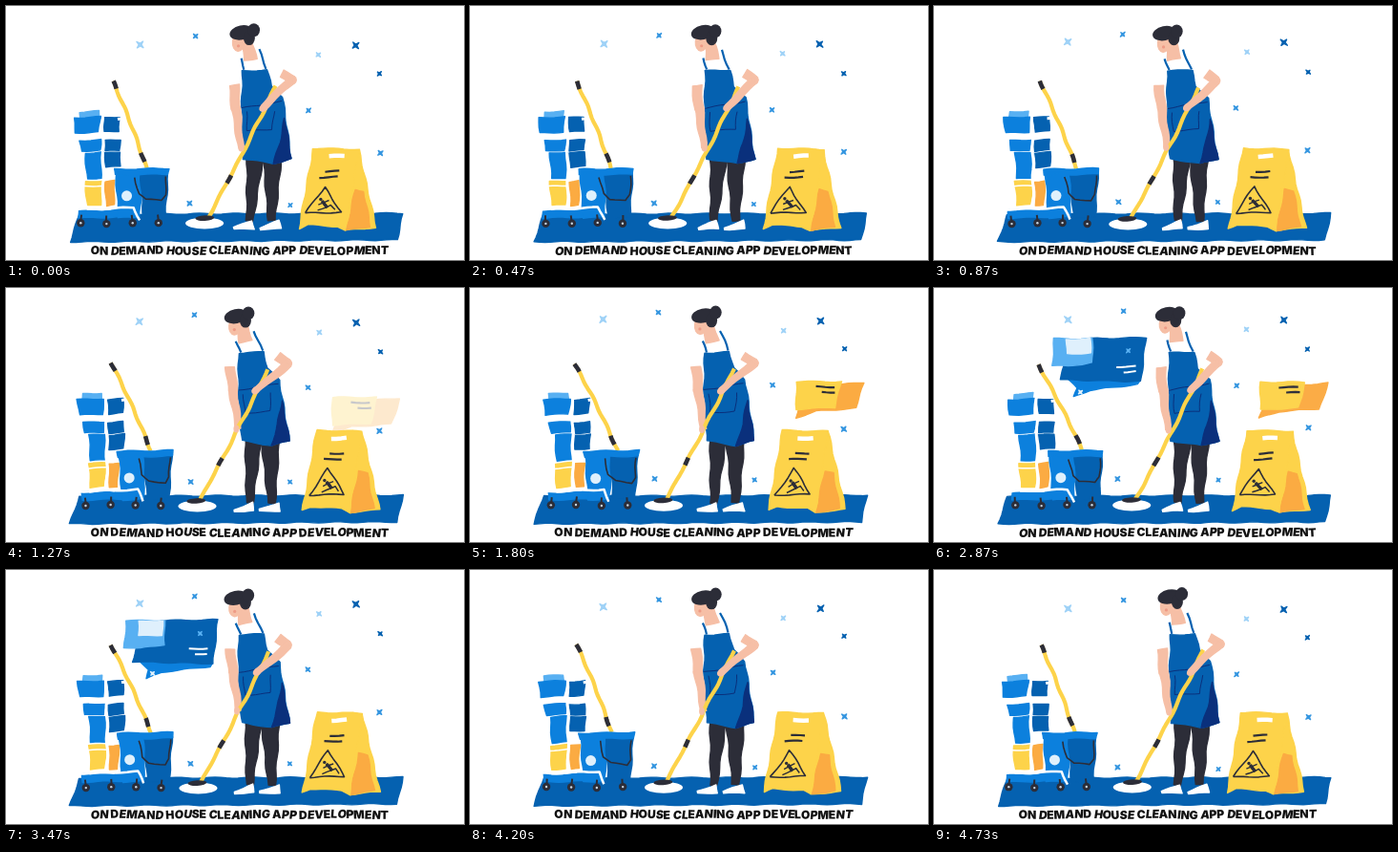
An HTML page with a canvas for the animation above (4.79 s loop, 480 px wide and 266 px high).

```html
<!DOCTYPE html>
<html lang="en">
<head>
<meta charset="utf-8">
<title>On demand house cleaning</title>
<style>
html, body { margin: 0; width: 100%; height: 100%; overflow: hidden; background: #fff; }
canvas { display: block; width: 100%; height: 100%; }
</style>
</head>
<body>
<canvas id="stage"></canvas>
<script>
const W = 480, H = 266, LOOP = 4790, STEPS = 72, TAU = Math.PI * 2;
const BLUE = '#0561b0', BRIGHT = '#0c80dd', SKY = '#58b0f2', PALE = '#dff0fc';
const NAVY = '#0a307c', INK = '#2c2d38', YELLOW = '#fdd34a', ORANGE = '#fbab42', SKIN = '#f6bfa6';
const CAPTION = 'ON DEMAND HOUSE CLEANING APP DEVELOPMENT';

const canvas = document.getElementById('stage');
const layer = document.createElement('canvas');
let ctx = canvas.getContext('2d');
let phase = 0;                       // position in the loop, 0..1
let warp = (x, y) => [x, y];         // motion of the current group

const swing = p => (1 - Math.cos(TAU * p)) / 2;
const clamp = v => Math.max(0, Math.min(1, v));
const mix = (a, b, k) => a + (b - a) * k;

// Hand-drawn wobble shared by every outline
function place(x, y) {
  const [px, py] = warp(x, y), a = TAU * 2 * phase;
  return [px + 0.7 * Math.sin(py * 0.2 + px * 0.04 + a),
          py + 0.6 * Math.sin(px * 0.16 - py * 0.04 - a)];
}

// Splits each side so that long edges wobble too
function trace(pts, closed) {
  const n = pts.length / 2, sides = closed ? n : n - 1;
  ctx.beginPath();
  for (let i = 0; i < sides; i++) {
    const j = (i + 1) % n;
    const [x0, y0, x1, y1] = [pts[2 * i], pts[2 * i + 1], pts[2 * j], pts[2 * j + 1]];
    const cuts = Math.ceil(Math.hypot(x1 - x0, y1 - y0) / 6);
    for (let c = 0; c <= cuts; c++) ctx.lineTo(...place(mix(x0, x1, c / cuts), mix(y0, y1, c / cuts)));
  }
  if (closed) ctx.closePath();
}

function line(color, width, ...pts) {
  trace(pts, false);
  ctx.strokeStyle = color;
  ctx.lineWidth = width;
  ctx.stroke();
}

function shape(color, ...pts) {
  trace(pts, true);
  ctx.fillStyle = ctx.strokeStyle = color;
  ctx.lineWidth = 1.4;
  ctx.fill();
  ctx.stroke();
}

// Box whose lower edge is narrower by `taper` on both sides
const box = (color, x, y, w, h, taper = 0) =>
  shape(color, x, y, x + w, y - 1, x + w - taper, y + h - 1, x + taper, y + h);

// Bar from one point to another, with its own width at each end
function limb(color, x0, y0, w0, x1, y1, w1) {
  const d = 2 * Math.hypot(x1 - x0, y1 - y0), nx = (y0 - y1) / d, ny = (x1 - x0) / d;
  shape(color, x0 + nx * w0, y0 + ny * w0, x1 + nx * w1, y1 + ny * w1,
    x1 - nx * w1, y1 - ny * w1, x0 - nx * w0, y0 - ny * w0);
}

function oval(color, x, y, rx, ry = rx, turn = 0) {
  ctx.beginPath();
  ctx.ellipse(...place(x, y), rx, ry, turn, 0, TAU);
  ctx.fillStyle = color;
  ctx.fill();
}

function star(x, y, r, color) {
  const pts = [];
  for (let i = 0; i < 8; i++) {
    const a = TAU / 8 * (i + 1), d = i % 2 ? r * 0.3 : r;
    pts.push(x + d * Math.cos(a), y + d * Math.sin(a));
  }
  shape(color, ...pts);
}

// Pole with a slight bulge and dark bands, given as [start, end] along its length
function pole(x0, y0, x1, y1, bulge, bands) {
  const at = k => [mix(x0, x1, k) + bulge * Math.sin(k * Math.PI), mix(y0, y1, k)];
  const part = (color, width, from, to) => {
    const pts = [];
    for (let i = 0; i <= 8; i++) pts.push(...at(mix(from, to, i / 8)));
    line(color, width, ...pts);
  };
  part(YELLOW, 4.2, 0, 1);
  for (const [from, to] of bands) part(INK, 4.6, from, to);
}

function group(move, draw) {
  warp = move;
  draw();
  warp = (x, y) => [x, y];
}

function drawStars() {
  const lift = 8 * swing(phase), tints = ['#9fd2f7', '#3596e0', BLUE];
  const spots = [[140, 40, 4.6], [198, 32, 3], [367, 41, 4.4], [328, 51, 3], [317, 109, 3], [392, 71, 2.8],
    [392, 154, 3.4], [193, 207, 3.2], [298, 208, 2.6]];
  spots.forEach(([x, y, r], i) => star(x, y - lift, r, tints[y > 150 ? 1 : i % 3]));
}

function drawCart() {
  const s = swing(phase), roll = (x, y) => [x + 7 * s, y];
  group(roll, () => {
    box(SKY, 77, 111, 20, 6);
    [[117, 16], [141, 11], [154, 27]].forEach(([y, h], i) => {
      box(BRIGHT, 71 + 6 * i, y, 28 - 4.5 * i, h, 2);
      box(BLUE, 103 + i / 2, y, 16, Math.min(h, 15), 0.5);
    });
    box(YELLOW, 83, 184, 18, 25, 2);
    box(ORANGE, 104, 184, 10, 25, 1);
    line('#fff', 1.5, 82, 189, 101, 188);
    box(BRIGHT, 76, 213, 42, 9);
    line('#fff', 2.6, 73, 213, 110, 212);
    line('#fff', 2.8, 101, 112, 102, 212);
    line('#fff', 3, 117, 118, 124, 117, 135, 158);
  });

  pole(112 - 3 * s, 78 + 2 * s, 147 + 9 * s, 170, 1.5, [[0, 0.09], [0.83, 0.93]]);

  group(roll, () => {
    box(BRIGHT, 115, 177, 28, 45, 3);
    box(BLUE, 141, 176, 29, 46, 3);
    box(BRIGHT, 113, 171, 58, 6, 1);
    line(INK, 1.6, 135, 179, 139, 196, 146, 202, 163, 204, 167, 198, 168, 178);
    oval(PALE, 126, 199, 5.5);
    line('#fff', 2.5, 84, 213, 134, 211, 140, 224);
    for (let i = 0; i < 4; i++) {
      const x = 79 + 26.7 * i;
      line(INK, 2, x, 219, x, 227);
      oval(INK, x, 227.5, 4.2);
      oval('#c7d5e2', x, 227.5, 1.2);
    }
  });
}

function drawSign() {
  const s = swing(phase);
  group((x, y) => [x + 6.5 * s, y], () => {
    shape(YELLOW, 360, 150, 370, 151, 388, 232, 356, 235);
    shape(ORANGE, 366, 192, 375, 194, 382, 231, 357, 235);
    shape(YELLOW, 322, 149, 370, 150, 356, 235, 348, 231, 316, 229, 307, 233);
    line('#fff', 4.5, 338, 157.5, 354, 157);
    line(INK, 2.2, 335, 173.5, 350, 173);
    line(INK, 2.2, 329, 179.5, 348, 179);
    line(INK, 1.6, 314, 217, 334, 189, 351, 216, 314, 217);
    // slipping figure
    oval(INK, 330, 202, 1.7);
    limb(INK, 332, 204, 2, 337, 210, 2);
    line(INK, 1.4, 328, 208, 334, 205, 339, 203);
    line(INK, 1.5, 327, 214, 337, 210, 341, 208, 345, 213);
  });
}

function drawWoman() {
  const lean = swing(phase * 2), sweep = swing(phase * 2 - 0.08);
  const bend = (x, y) => [x - 5.5 * lean * clamp((230 - y) / 205), y + 2 * lean * clamp((60 - y) / 35)];

  group(bend, () => {
    limb(INK, 261, 160, 17, 255.5, 225, 7);
    limb(INK, 279, 160, 19, 278.5, 225, 7.5);
    limb('#fff', 239, 233, 2, 259, 229, 9);
    limb('#fff', 266, 233, 2, 287, 229, 9);
    // head
    limb(SKIN, 253, 38, 10, 256, 56, 14);
    oval(SKIN, 244.5, 38, 7, 10, 0.1);
    oval(INK, 246.5, 27.5, 12.5, 7.5, -0.2);
    oval(INK, 255.5, 33, 6, 7.5);
    oval(INK, 259.5, 25, 6.3, 7);
    oval('#ee9b86', 244, 42, 1.6);
    // apron
    line(BLUE, 2.2, 250, 67, 246, 55);
    line(BLUE, 2.2, 273, 66, 265, 45);
    shape(BLUE, 248, 68, 274, 67, 278, 84, 290, 96, 299, 160, 280, 165, 249, 160, 247, 106);
    shape(NAVY, 292, 118, 299, 160, 280, 165, 287, 143);
    line(NAVY, 1, 247, 107, 289, 100);
    line(NAVY, 1, 252, 111, 253, 131, 279, 129, 281, 110);
    // near arm
    limb(SKIN, 239, 83, 10, 241, 108, 9);
    limb(SKIN, 241, 106, 9, 246, 148, 5.5);
  });

  group((x, y) => [x - 9 * sweep, y + 1.5 * sweep * clamp((150 - y) / 60)], () => {
    oval('#fff', 209, 228, 20, 6);
    pole(283, 84, 212, 222, 1.5, [[0.68, 0.74]]);
    oval(INK, 208.5, 222.5, 10, 2.8, -0.05);
  });

  // far arm, elbow following the body and hand following the handle
  const ex = 300 - 4 * lean, ey = 77 + 2 * lean, hx = 270 - 8 * sweep, hy = 106 + sweep;
  limb(SKIN, 289 - 4 * lean, 71, 9, ex, ey, 8);
  oval(SKIN, ex, ey, 4.4);
  limb(SKIN, ex, ey, 8, hx, hy, 6);
  oval(SKIN, hx, hy, 5, 3.8, -0.7);
  oval(SKIN, 246 - 4 * sweep, 148, 3, 4);
}

// Composes a card on its own layer; it rises while fading in and sinks while fading out
function card(from, to, draw) {
  const t = phase * LOOP, k = clamp(Math.min(t - from, to - t) / 450);
  if (!k) return;
  const main = ctx;
  layer.width = canvas.width;
  layer.height = canvas.height;
  ctx = layer.getContext('2d');
  ctx.setTransform(main.getTransform());
  ctx.lineJoin = 'round';
  group((x, y) => [x, y + 22 * (1 - k)], draw);
  ctx = main;
  ctx.globalAlpha = k;
  ctx.drawImage(layer, 0, 0, W, H);
  ctx.globalAlpha = 1;
}

function drawCards() {
  card(1150, 3300, () => {
    shape(ORANGE, 386, 101, 413, 99, 404, 126, 362, 129, 341, 136, 345, 125);
    shape(YELLOW, 342, 98, 389, 98, 382, 125, 342, 127);
    line(INK, 2.2, 362, 103.5, 382, 103.5);
    line(INK, 2.2, 369, 109, 383, 109);
  });
  card(2130, 4100, () => {
    shape(BRIGHT, 140, 96, 217, 97, 214, 101, 164, 107, 147, 114, 150, 105);
    shape(BLUE, 160, 53, 222, 52, 217, 98, 132, 96, 138, 78);
    shape(SKY, 126, 53, 166, 53, 166, 78, 141, 82, 124, 81);
    box(PALE, 139, 54, 25, 15);
    line('#fff', 2, 191, 82.5, 211, 82);
    line('#fff', 2, 198, 88, 211, 87.5);
    star(204, 66, 2.6, SKY);
    star(154, 109, 2.6, PALE);
  });
}

function drawCaption() {
  const a = TAU * 2 * phase;
  ctx.font = '900 12.1px Inter, "Open Sans", sans-serif';
  ctx.fillStyle = '#111';
  ctx.textAlign = 'center';
  let x = 88.5;
  [...CAPTION].forEach((ch, i) => {
    const w = ctx.measureText(ch).width;
    ctx.save();
    ctx.translate(x + w / 2, 260.3 + 0.6 * Math.sin(i * 0.62 + a));
    ctx.rotate(0.04 * Math.sin(i * 0.9 + a));
    ctx.transform(1, 0, -0.05 + 0.08 * Math.sin(i * 1.7 - a), 1, 0, 0);
    ctx.fillText(ch, 0, 0);
    ctx.restore();
    x += w;
  });
}

function render(now) {
  const dpr = window.devicePixelRatio || 1;
  const cw = Math.round(innerWidth * dpr), ch = Math.round(innerHeight * dpr);
  if (canvas.width !== cw || canvas.height !== ch) {
    canvas.width = cw;
    canvas.height = ch;
  }
  phase = Math.floor((now % LOOP) / LOOP * STEPS + 0.05) / STEPS;
  ctx.setTransform(cw / W, 0, 0, ch / H, 0, 0);
  ctx.lineJoin = 'round';
  ctx.fillStyle = '#fff';
  ctx.fillRect(0, 0, W, H);
  drawStars();
  shape(BLUE, 77, 218, 416, 217, 410, 245, 67, 247);
  drawCards();
  drawCart();
  drawSign();
  drawWoman();
  drawCaption();
}

function tick() {
  render(performance.now());
  requestAnimationFrame(tick);
}
tick();
</script>
</body>
</html>
```
